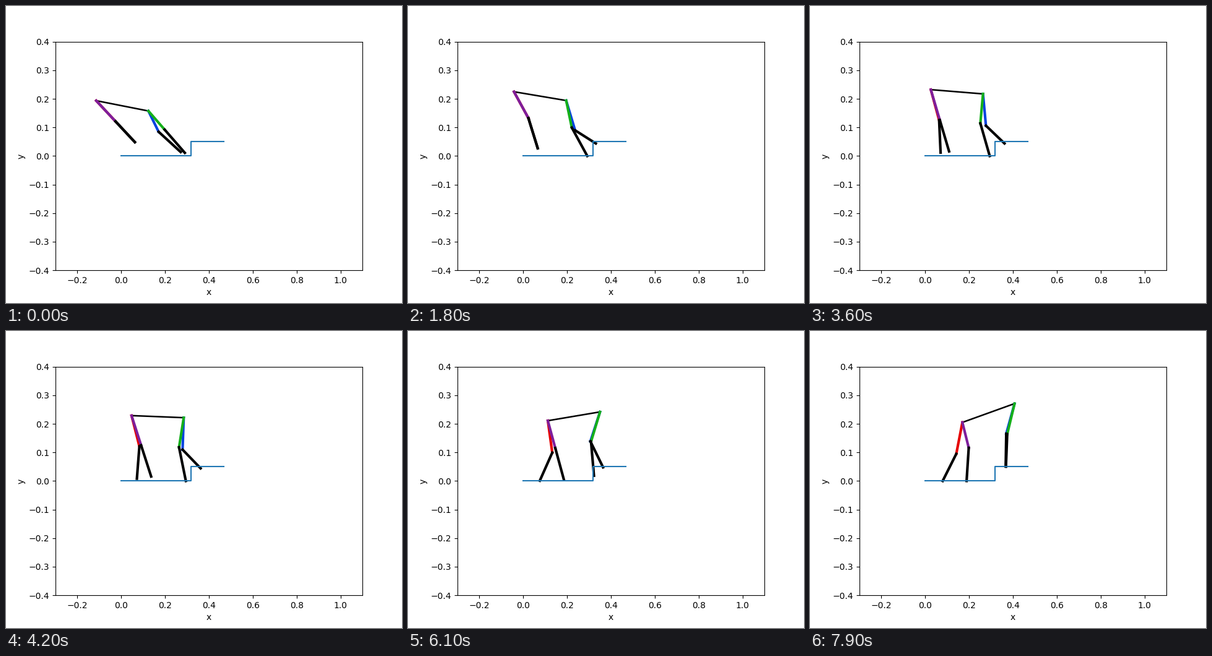
Recreate the animation shown at these times as a matplotlib script. Size 640 by 480 pixels, loop 8 s.

```python
import numpy as np
import matplotlib.pyplot as plt
from matplotlib.animation import FuncAnimation

FRAMES, STEP_MS = 80, 100
STEP_X, STEP_Y = 0.318, 0.05
t = np.arange(FRAMES) * STEP_MS / 1000  # seconds


def ramp(start, end):
    return np.clip((t - start) / (end - start), 0, 1)


def ease(start, end):
    return (1 - np.cos(np.pi * ramp(start, end))) / 2


def arc(start, end):
    return np.sin(np.pi * ramp(start, end))


def path(x, y):
    return np.column_stack(np.broadcast_arrays(x, y))


def bend(top, foot, thigh, shin, side):
    """Knee of a two-link leg; side is +1 for forward, -1 for backward."""
    chord = foot - top
    dist = np.hypot(chord[:, 0], chord[:, 1])
    stretch = np.maximum(1, dist / (thigh + shin))
    thigh, shin = thigh * stretch, shin * stretch
    along = (dist**2 + thigh**2 - shin**2) / (2 * dist)
    out = side * np.sqrt(np.maximum(thigh**2 - along**2, 0))
    ux, uy = chord.T / dist
    return top + path(along * ux - out * uy, along * uy + out * ux)


# Body: slowing advance, rear rises then sinks, front tilts up.
hip = path(-0.1143 + 0.0412 * t - 0.00067 * t**2,
           0.1935 + 0.0395 * np.sin(np.pi / 2 * ramp(0, 3.1))
           - 0.028 * ease(3.1, 7.4))
tilt = -0.036 + 0.00163 * t**2 + 0.008 * arc(5.4, 7.9)
shoulder = hip + path(0.238, tilt)

# Feet: the hind pair settles, then one steps; the front pair climbs in turn.
settle_x = 0.062 + 0.0022 * t
settle_y = 0.0485 * (1 - ramp(0, 7.1)) ** 2
stride = 1 - (1 - ramp(2.9, 6.8)) ** 2
climb = ramp(5.4, 7.3)
red_foot = path(settle_x, settle_y)
purple_foot = path(settle_x + (0.1885 - settle_x) * stride,
                   settle_y + 0.009 * arc(3, 6.8))
blue_foot = path(0.271 + 0.09 * ramp(0, 2.7) + 0.0015 * t * ramp(2.7, 7.9) / 2,
                 0.0139 + 0.03 * ramp(0, 1.6) + 0.0075 * ramp(4, 7.9))
green_foot = path(0.290 + 0.006 * ramp(0, 5.4) + 0.072 * climb,
                  0.011 * (1 - ramp(0, 1.8)) + STEP_Y * climb)

# Legs swing sideways too, so their visible lengths drift.
splay = ramp(2.9, 7.9)
tuck = 1 - ramp(0, 1.8)
LEGS = [
    ("xkcd:red", hip, red_foot, 0.1135, 0.1135, 1),
    ("xkcd:purple", hip, purple_foot,
     0.1135 - 0.02 * splay, 0.1135 + 0.003 * splay, 1),
    ("xkcd:blue", shoulder, blue_foot,
     0.112 - 0.0255 * tuck, 0.105 + 0.018 * tuck + 0.009 * ramp(5.4, 7.9), -1),
    ("xkcd:green", shoulder, green_foot,
     0.098 + 0.014 * ramp(2, 6), 0.122 - 0.008 * ramp(5.4, 7.9), -1),
]

fig, ax = plt.subplots(figsize=(6.4, 4.8), dpi=100)
ax.set(xlim=(-0.3, 1.1), ylim=(-0.4, 0.4), xlabel="x", ylabel="y")
ax.plot([0, STEP_X, STEP_X, STEP_X + 0.15], [0, 0, STEP_Y, STEP_Y],
        color="C0", lw=1.5, zorder=5)

links = []


def add_link(start, end, color, width, z):
    line, = ax.plot([], [], color=color, lw=width, zorder=z)
    links.append((line, start, end))


add_link(hip, shoulder, "black", 1.8, 2)
for color, top, foot, thigh, shin, side in LEGS:
    knee = bend(top, foot, thigh, shin, side)
    add_link(top, knee, color, 3, 3)
    add_link(knee, foot, "black", 3, 4)


def update(i):
    for line, start, end in links:
        line.set_data(*zip(start[i], end[i]))
    return [line for line, _, _ in links]


anim = FuncAnimation(fig, update, frames=FRAMES, interval=STEP_MS,
                     repeat=True, repeat_delay=0)
plt.show()
```
